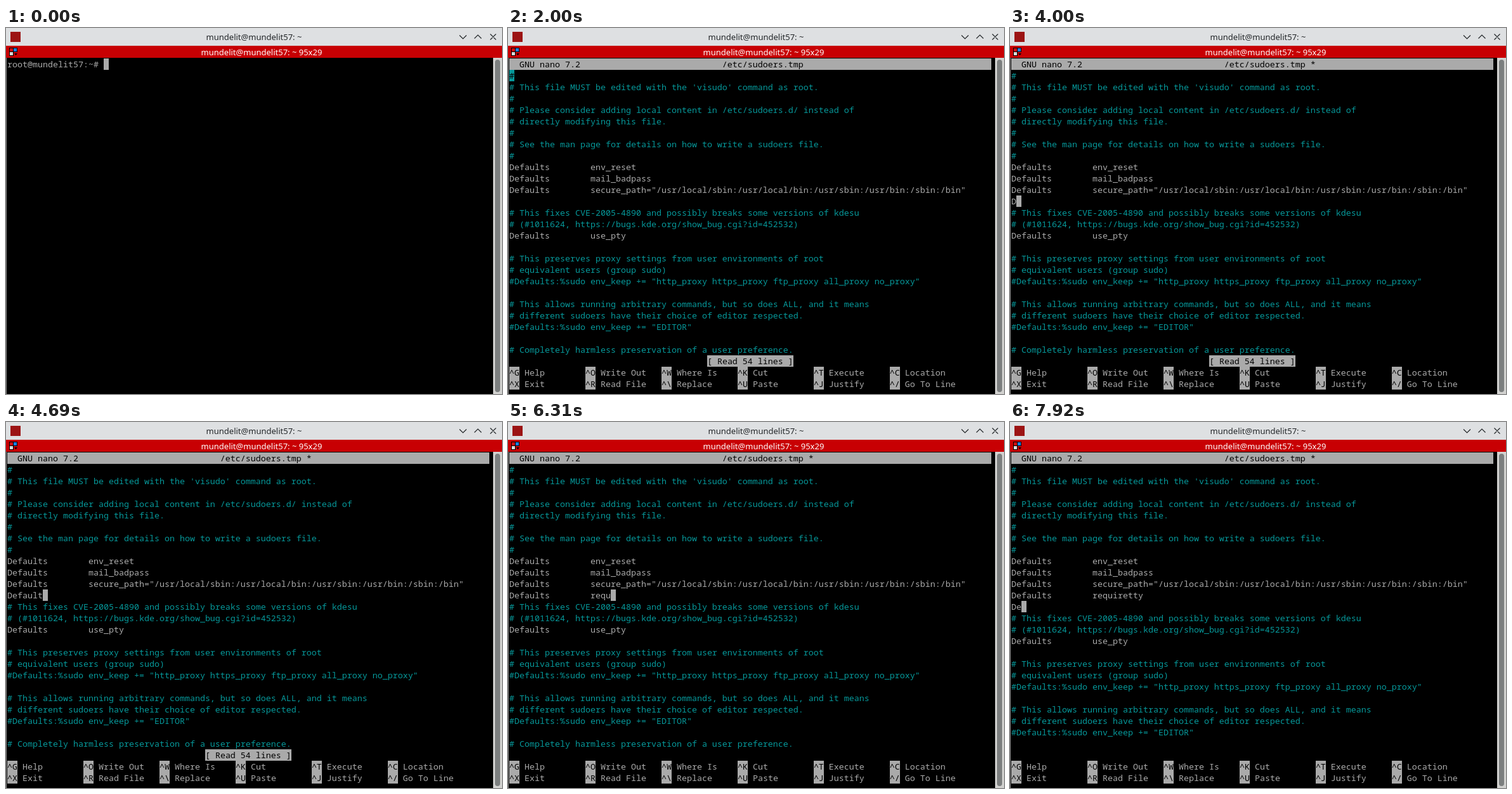
An HTML page for the animation above (8000 ms loop, 782 px wide and 577 px high).

```html
<!DOCTYPE html>
<html lang="en">
<head>
<meta charset="utf-8">
<title>Terminal</title>
<style>
html, body { margin: 0; width: 100%; height: 100%; overflow: hidden; background: #000; }
#win { position: absolute; left: 0; top: 0; width: 782px; height: 577px; overflow: hidden; background: #000; }
#win > * { position: absolute; }
.bar { font: 13px "Noto Sans", sans-serif; text-align: center; white-space: pre; }
#title { left: 0; top: 0; width: 782px; height: 28px; line-height: 28px; background: #dee0e2; color: #232629; }
#tab { left: 0; top: 28px; width: 758px; height: 19px; padding-left: 24px; line-height: 20px; background: #c80003; color: #fff; }
#edge { left: 0; top: 47px; width: 1px; height: 530px; background: #8a8a8a; }
#track { left: 768px; top: 47px; width: 14px; height: 530px; background: #d2d2d0; }
#thumb { left: 771px; top: 50px; width: 8px; height: 524px; border-radius: 4px; background: #7c7f7f; }
#icons { left: 0; top: 0; }
#screen { left: 2px; top: 48px; margin: 0; color: #aaa; font: 13.3333px/18px "Noto Sans Mono", monospace; font-variant-ligatures: none; }
#screen div { height: 18px; white-space: pre; }
#screen b { display: inline-block; height: 18px; vertical-align: top; font-weight: 400; background: #aaa; color: #000; }
#screen .note { color: #06989a; }
#screen .note b { background: #06989a; }
</style>
</head>
<body>
<div id="win">
  <div id="title" class="bar">mundelit@mundelit57: ~</div>
  <div id="tab" class="bar">mundelit@mundelit57: ~ 95x29</div>
  <div id="edge"></div>
  <div id="track"></div>
  <div id="thumb"></div>
  <svg id="icons" width="782" height="47" fill="none">
    <rect x="7" y="6" width="16" height="16" fill="#9c1414"/>
    <path d="M715 11.5l5.5 5.5 5.5-5.5M738.500 16.500l5.500-5.500 5.500 5.500M763.500 9.500l9 9m0-9l-9 9" stroke="#232629" stroke-width="1.200"/>
    <g stroke="#000">
      <rect x="5.500" y="31.500" width="6" height="6" fill="#d01010"/>
      <rect x="11.500" y="31.500" width="6" height="6" fill="#1a7fe0"/>
      <rect x="5.500" y="37.500" width="6" height="6" fill="#ddd"/>
    </g>
    <path d="M13 40h5l-2.500 3z" fill="#000"/>
  </svg>
  <pre id="screen"></pre>
</div>
<script>
const LOOP = 8000;
const screenEl = document.getElementById("screen");
const setting = value => "Defaults".padEnd(16) + value;
const inverse = s => `<b>${s}</b>`;

const file = [
  "#",
  "# This file MUST be edited with the 'visudo' command as root.",
  "#",
  "# Please consider adding local content in /etc/sudoers.d/ instead of",
  "# directly modifying this file.",
  "#",
  "# See the man page for details on how to write a sudoers file.",
  "#",
  setting("env_reset"),
  setting("mail_badpass"),
  setting('secure_path="/usr/local/sbin:/usr/local/bin:/usr/sbin:/usr/bin:/sbin:/bin"'),
  "",
  "# This fixes CVE-2005-4890 and possibly breaks some versions of kdesu",
  "# (#1011624, https://bugs.kde.org/show_bug.cgi?id=452532)",
  setting("use_pty"),
  "",
  "# This preserves proxy settings from user environments of root",
  "# equivalent users (group sudo)",
  '#Defaults:%sudo env_keep += "http_proxy https_proxy ftp_proxy all_proxy no_proxy"',
  "",
  "# This allows running arbitrary commands, but so does ALL, and it means",
  "# different sudoers have their choice of editor respected.",
  '#Defaults:%sudo env_keep += "EDITOR"',
  "",
  "# Completely harmless preservation of a user preference."
];
const EDIT_ROW = 11;
const VIEW_ROWS = 25;

const help = [
  ["^G Help", "^O Write Out", "^W Where Is", "^K Cut", "^T Execute", "^C Location"],
  ["^X Exit", "^R Read File", "^\\ Replace", "^U Paste", "^J Justify", "^/ Go To Line"]
];

// Key times; the typed line also lists the length reached.
const shellKeys = [540, 690, 770, 850, 920, 1000];
const downKeys = [3080, 3150, 3230, 3310, 3380];
const lineKeys = [
  [4000, 1], [4150, 2], [4230, 3], [4460, 5], [4620, 6], [4690, 7], [4850, 8], [5000, 9],
  [5310, 16], [5770, 17], [5920, 18], [6230, 19], [6310, 20], [6380, 21], [6540, 22],
  [6690, 23], [6920, 24], [7080, 25], [7230, 26]
];
const nextKeys = [7770, 7920];
const ENTER = 7380;

const pressed = (keys, t) => keys.filter(k => k <= t).length;
const lengthAt = t => lineKeys.reduce((n, [at, len]) => at <= t ? len : n, 0);
const row = (html, note) => `<div${note ? ' class="note"' : ""}>${html}</div>`;
const withCaret = (s, col) => s.slice(0, col) + inverse(s[col] || " ") + s.slice(col + 1);

function shell(t) {
  const line = "root@mundelit57:~# " + "visudo".slice(0, pressed(shellKeys, t));
  const hidden = (t >= 460 && t < 540) || t >= 1620;
  return row(hidden ? line : withCaret(line, line.length));
}

function nano(t) {
  const lines = file.slice();
  const typed = setting("requiretty").slice(0, lengthAt(t));
  let caretRow = t < 2460 ? 0 : 1 + 2 * pressed(downKeys, t);
  let caretCol = typed.length;
  lines[EDIT_ROW] = typed;
  if (t >= ENTER) {
    const next = "De".slice(0, pressed(nextKeys, t));
    caretRow = EDIT_ROW + 1;
    caretCol = next.length;
    lines.splice(caretRow, 0, next);
  }
  const header = ("  GNU nano 7.2".padEnd(42) + "/etc/sudoers.tmp" + (typed ? " *" : "")).padEnd(95);
  const body = lines.slice(0, VIEW_ROWS).map((s, i) =>
    row(i === caretRow ? withCaret(s, caretCol) : s, s[0] === "#"));
  const status = t < 5000 ? " ".repeat(39) + inverse("[ Read 54 lines ]") : "";
  const menu = help.map(items => row(items.map(s =>
    inverse(s.slice(0, 2)) + s.slice(2).padEnd(13)).join("")));
  return row(inverse(header)) + body.join("") + row(status) + menu.join("");
}

let shown = "";
function draw(now) {
  const t = now % LOOP;
  const html = t < 2000 ? shell(t) : nano(t);
  if (html !== shown) screenEl.innerHTML = shown = html;
}

function tick(now) {
  draw(now);
  requestAnimationFrame(tick);
}
draw(0);
requestAnimationFrame(tick);
</script>
</body>
</html>
```
